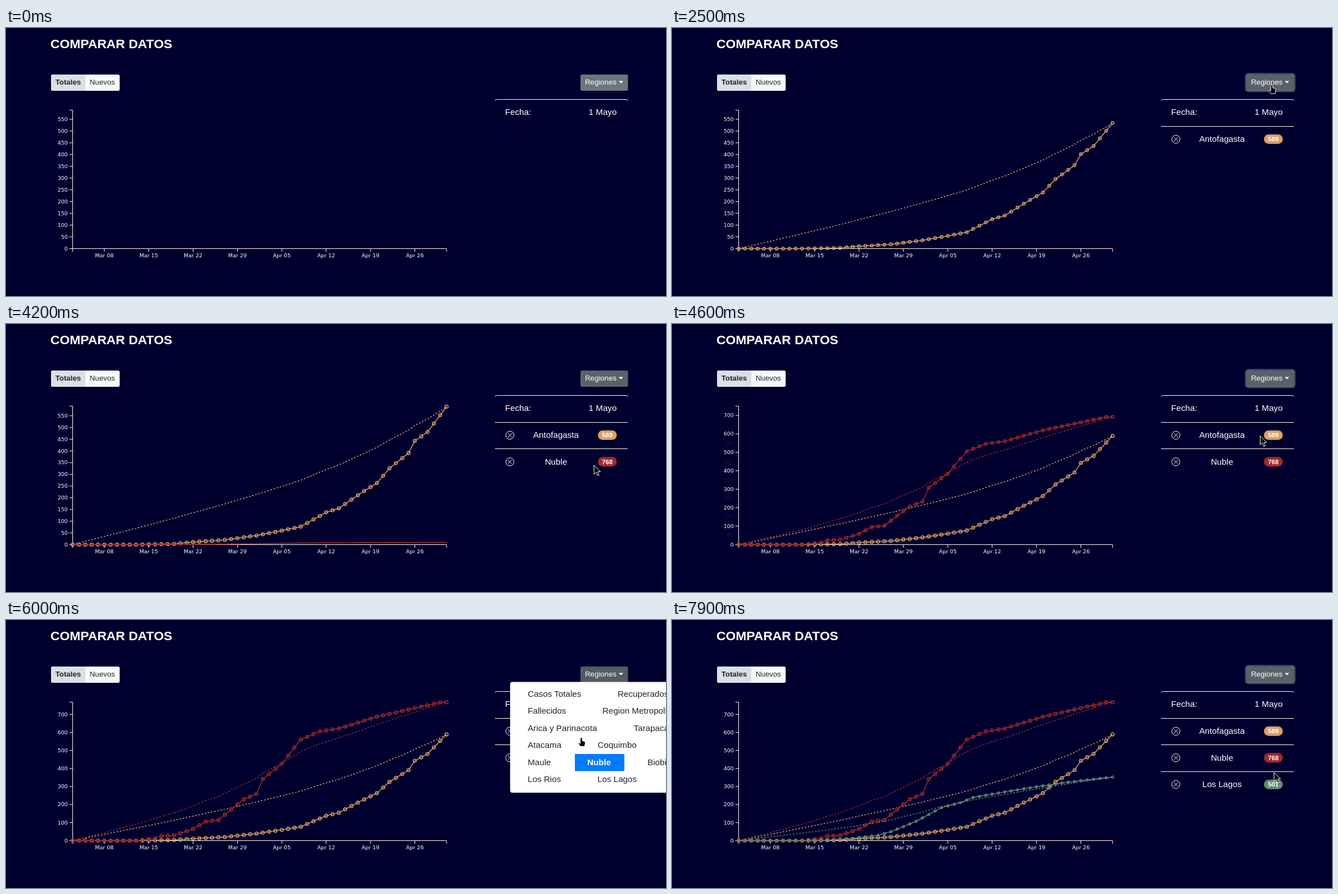
Animation, 1173 px wide and 478 px high, one loop 8000 ms. Source, as an HTML page:

```html
<!DOCTYPE html>
<html lang="es">
<head>
<meta charset="utf-8">
<title>Comparar datos</title>
<style>
  html, body { margin: 0; width: 100%; height: 100%; overflow: hidden; background: #00002e; }
  svg { display: block; font: 15.2px "Liberation Sans", Arial, sans-serif; fill: #fff; }
  .small { font-size: 13.3px; }
  .badge { font-size: 11.4px; font-weight: bold; text-anchor: middle; }
  .axis { font: 9.5px "DejaVu Sans", sans-serif; }
  .rule { fill: none; stroke: #fffff0; }
  .menu { fill: #212529; }
</style>
</head>
<body>
<svg id="stage" width="1173" height="478" viewBox="0 0 1173 478"></svg>
<script>
const LOOP = 8000, STEP = 100, GROW = 700;
const LEFT = 118.5, RIGHT = 783, BASE = 393.5, HEIGHT = 247, LAST_DAY = 59;

const mix = (a, b, k) => a + (b - a) * k;
const clamp = k => Math.min(1, Math.max(0, k));
const within = (t, ...spans) => spans.some(([a, b]) => t >= a && t < b);
const dayX = day => mix(LEFT, RIGHT, day / LAST_DAY);

function ease(k) {
  k = clamp(k);
  return k < 0.5 ? 4 * k ** 3 : 1 - 4 * (1 - k) ** 3;
}

// Daily totals between a few [day, total] bends.
function totals(bends) {
  return Array.from({ length: LAST_DAY + 1 }, (_, day) => {
    const next = bends.findIndex(b => b[0] >= day);
    if (next === 0) return bends[0][1];
    const [d0, v0] = bends[next - 1], [d1, v1] = bends[next];
    return mix(v0, v1, (day - d0) / (d1 - d0));
  });
}

// Smoothed values pulled towards the straight line between the ends.
function bundle(values) {
  const end = values[LAST_DAY];
  return values.map((v, i) => {
    if (i === 0 || i === LAST_DAY) return v;
    const smooth = (values[i - 1] + 4 * v + values[i + 1]) / 6;
    return mix(end * i / LAST_DAY, smooth, 0.3);
  });
}

function region(name, color, start, bends) {
  const values = totals(bends);
  return { name, color, start, values, trend: bundle(values), max: values[LAST_DAY] };
}

const regions = [
  region('Antofagasta', '#d9a066', 2000, [[10, 0], [16, 3], [19, 11], [24, 20], [29, 39], [33, 60], [36, 77],
    [40, 138], [42, 155], [45, 211], [48, 263], [50, 326], [53, 391], [54, 443], [56, 481], [59, 589]]),
  region('Nuble', '#a52a2a', 4088, [[10, 0], [13, 12], [14, 26], [16, 29], [19, 65], [21, 106], [23, 114],
    [25, 173], [27, 229], [29, 259], [30, 342], [33, 426], [36, 561], [39, 606], [42, 622], [48, 687],
    [58, 767], [59, 768]]),
  region('Los Lagos', '#628b74', 7494, [[13, 0], [18, 18], [22, 42], [24, 70], [28, 152], [32, 260],
    [35, 300], [37, 340], [42, 384], [46, 417], [52, 461], [59, 501]])
];

// Pointer moves: [from, until, x, y]
const moves = [
  [300, 400, 1096, 146], [500, 700, 1066, 102], [1100, 1200, 1066, 126], [1300, 1500, 1140, 182],
  [2000, 2500, 1066, 102], [3100, 3200, 1063, 111], [3300, 3600, 1060, 212], [3700, 4000, 1045, 252],
  [4500, 4800, 1046, 95], [5100, 5500, 1038, 126], [5500, 6400, 1010, 278], [6500, 6900, 1070, 257],
  [6900, 7300, 1070, 286], [7600, 7900, 1070, 272]
];

const text = (x, y, s, attrs = '') => `<text x="${x}" y="${y}" ${attrs}>${s}</text>`;
const path = (d, attrs = 'class="rule"') => `<path d="${d}" ${attrs}/>`;
const rect = (x, y, w, h, fill, attrs = '') =>
  `<rect x="${x}" y="${y}" width="${w}" height="${h}" fill="${fill}" ${attrs}/>`;

function header(open, focused, hovered) {
  const fill = focused || hovered ? '#5a6268' : open ? '#545b62' : '#6c757d';
  const ring = focused
    ? rect(1019.8, 81.6, 86.8, 31.3, 'none', 'rx="4.5" stroke="#828a91" stroke-opacity=".55" stroke-width="2.8"') : '';
  return text(79, 36, 'COMPARAR DATOS', 'font-size="22.8" font-weight="bold"') +
    rect(80, 83, 122, 29, '#f8f9fa', 'rx="3"') +
    path('M141 83H83q-3 0-3 3V109q0 3 3 3H141z', 'fill="#dae0e5"') +
    text(87.7, 101, 'Totales', 'class="small" font-weight="bold" fill="#212529"') +
    text(148.7, 101, 'Nuevos', 'class="small" fill="#212529"') +
    rect(1021, 83, 84.5, 29, fill, 'rx="3"') + ring +
    text(1029, 101, 'Regiones', 'class="small"') +
    path('M1089 94.5h8l-4 4z', '');
}

function axes(rescale, scale) {
  let out = path(`M112.8 ${BASE - HEIGHT}H${LEFT}V${BASE}H112.8M${LEFT} 399.2V${BASE}H${RIGHT}V399.2`);
  for (let v = 0; v <= 700; v += 50) {
    const opacity = v > 550 ? (v % 100 ? 0 : rescale) : v % 100 ? 1 - rescale : 1;
    if (opacity < 0.005) continue;
    const y = BASE - v * scale;
    out += `<g opacity="${opacity}">` + path(`M112.8 ${y}H${LEFT}`) +
      text(109.8, y + 3.2, v, 'text-anchor="end"') + '</g>';
  }
  ['Mar 08', 'Mar 15', 'Mar 22', 'Mar 29', 'Apr 05', 'Apr 12', 'Apr 19', 'Apr 26'].forEach((label, week) => {
    const x = dayX(5 + 7 * week);
    out += path(`M${x} ${BASE}v5.7`) + text(x, 408.8, label, 'text-anchor="middle"');
  });
  return `<g class="axis">${out}</g>`;
}

function series({ color, values, trend }, grown, scale) {
  const y = v => BASE - v * grown * scale;
  const line = list => 'M' + list.map((v, i) => `${dayX(i)} ${y(v)}`).join('L');
  const dots = values.map((v, i) => `<circle cx="${dayX(i)}" cy="${y(v)}" r="${2.85 * grown}"/>`).join('');
  return `<g fill="none" stroke="${color}" stroke-width="1.45">` +
    path(line(trend), 'stroke-dasharray="2.85"') + path(line(values), '') + dots + '</g>';
}

function panel(rows) {
  let out = path('M869.5 129.5q0-2 3-2H1102q3 0 3 2') +
    text(887, 155, 'Fecha:') + text(1085.4, 155, '1 Mayo', 'text-anchor="end"');
  rows.forEach((r, i) => {
    const y = 198.3 + 47.5 * i;
    out += path(`M869 ${Math.floor(175 + 47.5 * i) + 0.5}H1105`) +
      `<circle cx="895.5" cy="${y}" r="7.2" fill="none" stroke="#fff"/>` +
      path(`M892 ${y - 3.5}l7 7m0-7l-7 7`, 'stroke="#fff"') +
      text(977.5, y + 4.7, r.name, 'text-anchor="middle"') +
      rect(1052, y - 8.5, 33.5, 17, r.color, 'rx="8.5"') +
      text(1068.7, y + 3.7, r.max, 'class="badge"');
  });
  return out;
}

function menu(nubleActive) {
  const rows = [
    ['Casos Totales', 1087, 'Recuperados'], ['Fallecidos', 1060, 'Region Metropolitana'],
    ['Arica y Parinacota', 1115.6, 'Tarapaca'], ['Atacama', 1051.6, 'Coquimbo'],
    ['Maule', 1033, 'Nuble', nubleActive ? 1140 : 1137, 'Biobio'], ['Los Rios', 1051, 'Los Lagos']
  ];
  let out = rect(896, 110.5, 300, 197.5, '#fff', 'rx="4"');
  if (nubleActive) out += rect(1011, 239, 88, 30.5, '#007bff');
  rows.forEach(([first, ...rest], i) => {
    const y = 137 + 30.4 * i;
    out += text(927.2, y, first);
    for (let k = 0; k < rest.length; k += 2) {
      const active = nubleActive && rest[k + 1] === 'Nuble';
      out += text(rest[k], y, rest[k + 1], active ? 'fill="#fff" font-weight="bold"' : '');
    }
  });
  return `<g class="menu">${out}</g>`;
}

function pointerAt(t) {
  if (!within(t, [300, 1600], [2100, LOOP])) return null;
  return moves.reduce(([x, y], [from, until, toX, toY]) => {
    const k = clamp((t - from) / (until - from));
    return [mix(x, toX, k), mix(y, toY, k)];
  }, [1124, 195]);
}

function pointer([x, y], hand) {
  const shape = hand
    ? 'M-1.8 1Q-1.8-.8 0-.8T1.8 1V5L5.6 6Q7 6.5 7 8.5L6 15H-1.5L-5.3 9.5Q-4.5 7.5-3.2 8.8L-1.8 10Z'
    : 'M0 0V16L4 12.5L6.5 18.7L9 17.7L6.5 11.5H11.5Z';
  return path(shape, `transform="translate(${x} ${y})" fill="#000" stroke="#fff"`);
}

function draw(t) {
  const open = within(t, [1000, 2100], [3000, 4100], [4900, 7500]);
  const focused = within(t, [2200, 3200], [4300, 5400], [7600, LOOP]);
  const tip = pointerAt(t);
  const onButton = !!tip && within(tip[0], [1021, 1105]) && within(tip[1], [83, 112]);
  const hovered = (onButton && !open) || within(t, [4100, 4300], [7500, 7600]);
  const grown = regions.map(r => ease((t - r.start) / GROW));
  const wide = HEIGHT / regions[1].max;
  const scale = mix(HEIGHT / regions[0].max, wide, grown[1]);
  const rows = regions.filter(r => t > r.start);

  document.getElementById('stage').innerHTML =
    header(open, focused, hovered) + axes(grown[1], scale) +
    rows.map((r, i) => series(r, grown[i], i ? wide : scale)).join('') +
    panel(rows) + (open ? menu(t >= 4100) : '') +
    (tip ? pointer(tip, open || onButton) : '');
}

let drawn = -1;
function tick() {
  const t = Math.floor(performance.now() % LOOP / STEP) * STEP;
  if (t !== drawn) draw(drawn = t);
  requestAnimationFrame(tick);
}
tick();
</script>
</body>
</html>
```
